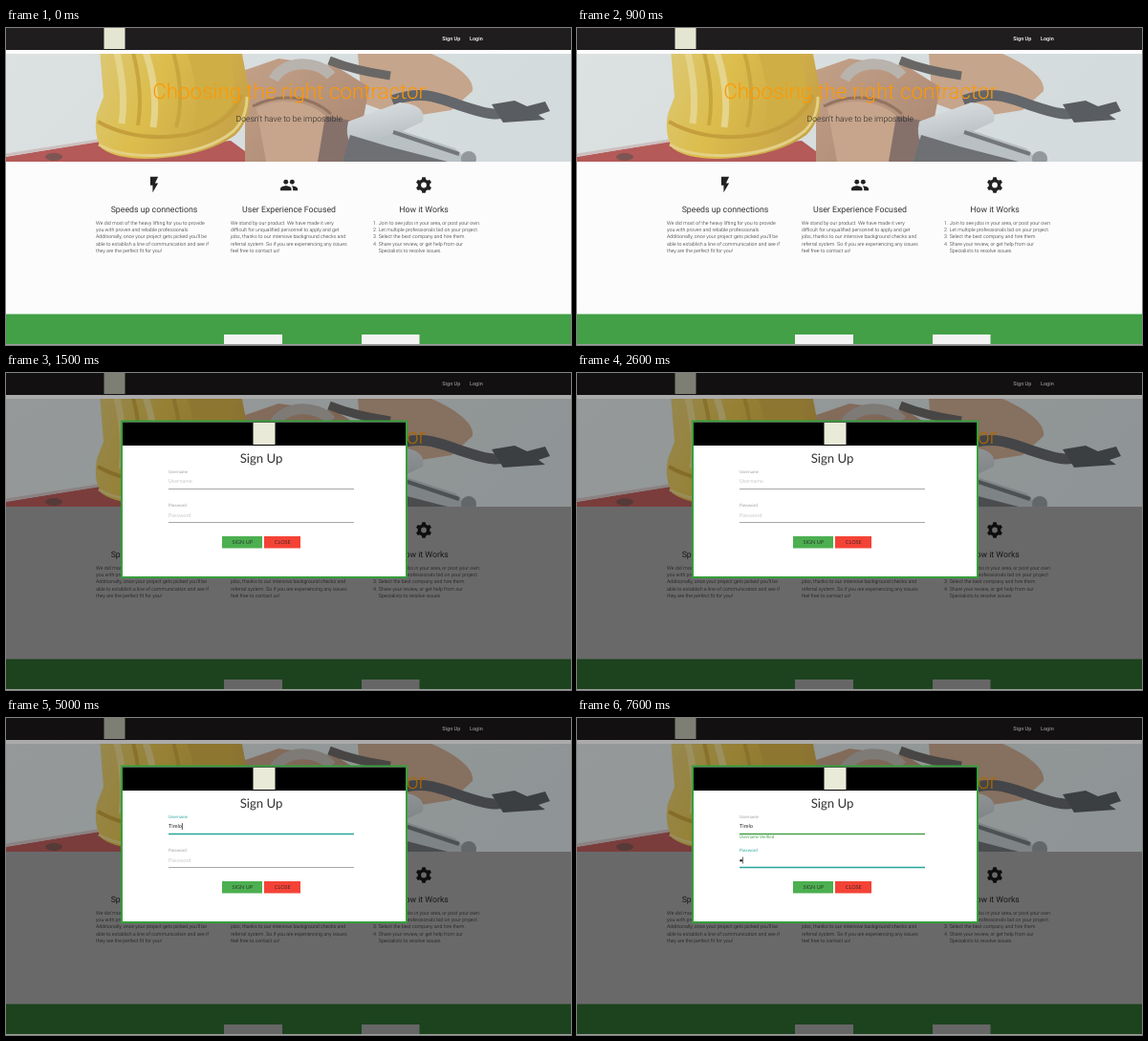
Recreate the animation shown at these times as an HTML page. Size 591 by 332 pixels, loop 8000 ms.

```html
<!DOCTYPE html>
<html lang="en">
<head>
<meta charset="utf-8">
<title>Contractor sign-up</title>
<style>
html, body { margin: 0; width: 100%; height: 100%; overflow: hidden; background: #fff; }
svg { display: block; width: 591px; height: 332px; }
text { font-family: Roboto, sans-serif; fill: #222; text-rendering: geometricPrecision; white-space: pre; }
.mid { text-anchor: middle; }
.nav text { font-size: 5.5px; font-weight: 500; fill: #fff; }
.head text { font-size: 8.76px; fill: #333; }
.copy text { font-size: 5.27px; font-weight: 300; }
#modal text { font-family: Lato, sans-serif; }
#modal .label { font-size: 4.5px; fill: #9e9e9e; }
#modal .field { font-size: 5.6px; }
#modal .hint { font-size: 5.6px; fill: #c8c8c8; }
#modal .btn { font-size: 5.5px; fill: #222; fill-opacity: .8; }
#modal .option { font-size: 5.9px; font-weight: 700; fill: #111; }
</style>
</head>
<body>
<svg viewBox="0 0 591 332" xmlns="http://www.w3.org/2000/svg">
  <defs>
    <clipPath id="heroClip"><rect y="27" width="591" height="113"/></clipPath>
    <linearGradient id="wall" x2="1" y2=".2">
      <stop stop-color="#dce1e1"/><stop offset="1" stop-color="#d3dbdc"/>
    </linearGradient>
    <linearGradient id="shell" x2="1" y2=".3">
      <stop stop-color="#dcc876"/><stop offset=".45" stop-color="#dcbd4c"/><stop offset="1" stop-color="#c9a548"/>
    </linearGradient>
    <linearGradient id="leather" x2="1" y2="1">
      <stop stop-color="#c3a188"/><stop offset="1" stop-color="#a88570"/>
    </linearGradient>
    <linearGradient id="roll" x2=".3" y2="1">
      <stop stop-color="#dde2e4"/><stop offset="1" stop-color="#b4bbbf"/>
    </linearGradient>
  </defs>
  <rect width="591" height="332" fill="#fdfcfd"/>

  <g clip-path="url(#heroClip)">
    <rect y="27" width="591" height="113" fill="url(#wall)"/>
    <path d="M0 135L96 119 130 128 235 118 265 140H0Z" fill="#b45a58"/>
    <path d="M0 133L96 118" stroke="#cdbfbf" stroke-width="3"/>
    <ellipse cx="50" cy="135" rx="9" ry="4" fill="#7d5553"/>

    <path d="M368 27H445C470 38 490 52 488 66L466 86 415 94 372 78Z" fill="#c5a58c"/>
    <path d="M250 44L285 32 345 40 380 62 372 104 352 140H250Z" fill="url(#leather)"/>
    <path d="M262 84C285 72 318 76 334 92L330 140H272Z" fill="#c6a58c"/>
    <path d="M334 92L366 98 352 140H326Z" fill="#85716a"/>
    <g fill="none">
      <path d="M280 54C290 34 325 32 340 50" stroke="#b9b3ae" stroke-width="11"/>
      <path d="M258 82C285 68 318 70 340 90" stroke="#927462" stroke-width="3"/>
      <path d="M338 34C358 42 375 46 402 50" stroke="#696765" stroke-width="9"/>
      <path d="M404 76C436 64 454 74 478 82S512 92 528 88" stroke="#63666a" stroke-width="11"/>
    </g>
    <path d="M508 80L532 76 545 82 564 77 569 87 557 91 564 96 520 99Z" fill="#595c60"/>
    <path d="M358 98L412 78Q440 80 436 98L376 126Q352 126 358 98Z" fill="url(#roll)"/>
    <path d="M385 118L412 107 470 126 484 140H372Z" fill="#b9c0c3"/>
    <path d="M360 112L400 124 462 140H352Z" fill="#6e7073"/>
    <path d="M405 109L474 132" stroke="#73777b" stroke-width="4"/>
    <circle cx="484" cy="137" r="8" fill="#92989c"/>

    <path d="M98 22L102 72 95 90Q91 112 100 126 120 140 165 136 212 132 240 112 256 96 255 70L246 22Z" fill="url(#shell)"/>
    <path d="M188 22Q205 68 196 106 226 98 238 78 242 48 230 22Z" fill="#cfae45"/>
    <path d="M115 22Q126 66 121 100M145 22Q160 64 154 104" fill="none" stroke="#e5d48c" stroke-width="7"/>
    <path d="M132 22Q144 66 138 102M174 22Q188 68 178 104" fill="none" stroke="#c8a63f" stroke-width="4"/>
    <path d="M96 98Q135 120 188 112 234 102 247 70" fill="none" stroke="#c49f3c" stroke-width="4"/>
    <path d="M97 122Q120 136 165 133 212 129 238 108 252 94 252 72" fill="none" stroke="#e3d086" stroke-width="3"/>
  </g>
  <text class="mid" x="296.2" y="74" font-size="22.35" font-weight="300" style="fill:#ff9800">Choosing the right contractor</text>
  <text class="mid" x="296.2" y="98" font-size="8.58" font-weight="300">Doesn't have to be impossible</text>

  <rect width="591" height="23" fill="#201d1e"/>
  <rect x="102.500" width="22" height="22" fill="#e4e6d2"/>
  <g class="nav"><text x="456.300" y="13">Sign Up</text><text x="485" y="13">Login</text></g>

  <g fill="#212121">
    <path transform="translate(145.200 154.200) scale(.82)" d="M7 2v11h3v9l7-12h-4l4-8z"/>
    <g transform="translate(286.200 154.700) scale(.82)">
      <circle cx="8" cy="8" r="3"/><circle cx="16" cy="8" r="3"/>
      <path d="M1 19v-2.500C1 14.200 5.700 13 8 13s7 1.200 7 3.500V19zM17 19v-2.500c0-1.500-.8-2.600-2-3.400 3-.4 8 .9 8 3.400V19z"/>
    </g>
    <g id="gear" transform="translate(437 164.500)">
      <circle r="4.600" fill="none" stroke="#212121" stroke-width="3.400"/>
    </g>
  </g>
  <g class="head">
    <text class="mid" x="155" y="193">Speeds up connections</text>
    <text class="mid" x="296" y="193">User Experience Focused</text>
    <text class="mid" x="437" y="193">How it Works</text>
  </g>
  <g id="copy" class="copy"></g>

  <rect y="299.600" width="591" height="32.400" fill="#43a047"/>
  <path d="M228 321h61v10h-61zM372 321h60.500v10h-60.500z" fill="#f3f3f3"/>
  <path d="M0 331.500H591" stroke="#9a9d9a"/>

  <g id="modal">
    <rect width="591" height="23" opacity=".45"/>
    <rect y="23" width="591" height="117" opacity=".32"/>
    <rect y="140" width="591" height="191" opacity=".58"/>
    <rect x="121" y="50.500" width="298" height="163.500" fill="#fff" stroke="#35a03b" stroke-width="2"/>
    <rect x="122" y="51.500" width="296" height="24.500"/>
    <rect x="258.500" y="52" width="23" height="23" fill="#e9ebd8"/>
    <text class="mid" x="267" y="94" font-size="13.200" style="fill:#333">Sign Up</text>

    <text id="userLabel" class="label" x="170" y="104.700">Username</text>
    <text id="userHint" class="hint" x="170" y="115.300">Username</text>
    <text id="user" class="field" x="170" y="115.300"></text>
    <path id="userLine" d="M170 121.500H364"/>
    <text id="verified" class="label" x="170" y="126.400" style="fill:#43a047">Username Verified</text>

    <text id="passLabel" class="label" x="170" y="140.300">Password</text>
    <text id="passHint" class="hint" x="170" y="150.900">Password</text>
    <circle id="dot" cx="171.600" cy="149.200" r="1.300" fill="#222"/>
    <path id="passLine" d="M170 156.500H364"/>
    <path id="caret" stroke="#222" stroke-width=".7"/>

    <g id="menu">
      <rect x="170.500" y="121.500" width="194.500" height="23" fill="#fff" stroke="#bdbdbd"/>
      <rect id="pick" x="171" y="122" width="193.500" height="11" fill="#e4e4e4"/>
      <text class="option" x="174.500" y="129.700">Tirelo</text>
      <text class="option" x="174.500" y="140.700">Tirel</text>
    </g>

    <rect x="226" y="171" width="42" height="12.500" fill="#4caf50"/>
    <rect x="270" y="171" width="38" height="12.500" fill="#f44336"/>
    <text class="btn mid" x="247.300" y="179.200">SIGN UP</text>
    <text class="btn mid" x="289.300" y="179.200">CLOSE</text>
  </g>
</svg>
<script>
const LOOP = 8000;
const AT = { open: 1500, user: 2800, first: 3500, second: 3900, pick: 4300, done: 4700, pass: 5300, dot: 7600 };
const TEAL = '#26a69a', GREY = '#9e9e9e', GREEN = '#43a047';
const $ = id => document.getElementById(id);

function add(parent, tag, attrs, text = '') {
  const el = document.createElementNS('http://www.w3.org/2000/svg', tag);
  for (const key in attrs) el.setAttribute(key, attrs[key]);
  el.textContent = text;
  parent.append(el);
}

function paragraph(x, lines) {
  lines.forEach((line, i) => add($('copy'), 'text', { x, y: 205.5 + i * 7.45 }, line));
}

paragraph(94, [
  'We did most of the heavy lifting for you to provide',
  'you with proven and reliable professionals.',
  "Additionally, once your project gets picked you'll be",
  'able to establish a line of communication and see if',
  'they are the perfect fit for you!'
]);
paragraph(235, [
  'We stand by our product. We have made it very',
  'difficult for unqualified personnel to apply and get',
  'jobs, thanks to our intensive background checks and',
  'referral system. So if you are experiencing any issues',
  'feel free to contact us!'
]);
paragraph(384, ['1.', '2.', '3.', '4.']);
paragraph(389.7, [
  'Join to see jobs in your area, or post your own.',
  'Let multiple professionals bid on your project.',
  'Select the best company and hire them.',
  'Share your review, or get help from our',
  'Specialists to resolve issues.'
]);
for (let a = 0; a < 360; a += 60) {
  add($('gear'), 'path', { d: 'M-2.3 -5.5L-1.7 -8.2H1.7L2.3 -5.5Z', transform: `rotate(${a})` });
}

const show = (id, on) => $(id).setAttribute('visibility', on ? 'inherit' : 'hidden');

function line(id, color, width) {
  $(id).setAttribute('stroke', color);
  $(id).setAttribute('stroke-width', width);
}

function draw(t) {
  const onUser = t >= AT.user && t < AT.pass;
  const onPass = t >= AT.pass;
  const typed = t < AT.first ? '' : t < AT.second ? 'T' : t < AT.pick ? 'Ti' : 'Tirelo';

  show('modal', t >= AT.open);
  $('user').textContent = typed;
  show('userHint', !typed);
  $('userLabel').style.fill = onUser ? TEAL : GREY;
  line('userLine', onPass ? GREEN : onUser ? TEAL : GREY, onUser || onPass ? 1.3 : 0.9);
  show('verified', onPass);
  show('menu', t >= AT.first && t < AT.done);
  show('pick', t >= AT.pick && t < AT.done);

  $('passLabel').style.fill = onPass ? TEAL : GREY;
  line('passLine', onPass ? TEAL : GREY, onPass ? 1.3 : 0.9);
  show('passHint', t < AT.dot);
  show('dot', t >= AT.dot);

  // The caret restarts its blink on every focus or key.
  const since = Math.max(...Object.values(AT).filter(v => v <= t), 0);
  const x = onPass ? (t >= AT.dot ? 173.4 : 170.4)
                   : 170.4 + (typed ? $('user').getComputedTextLength() : 0);
  $('caret').setAttribute('d', `M${x} ${onPass ? 145.5 : 110}v7`);
  show('caret', (onUser || onPass) && Math.floor((t - since) / 500) % 2 === 0);
}

const start = performance.now();
function tick() {
  draw((performance.now() - start) % LOOP);
  requestAnimationFrame(tick);
}
draw(0);
tick();
</script>
</body>
</html>
```
